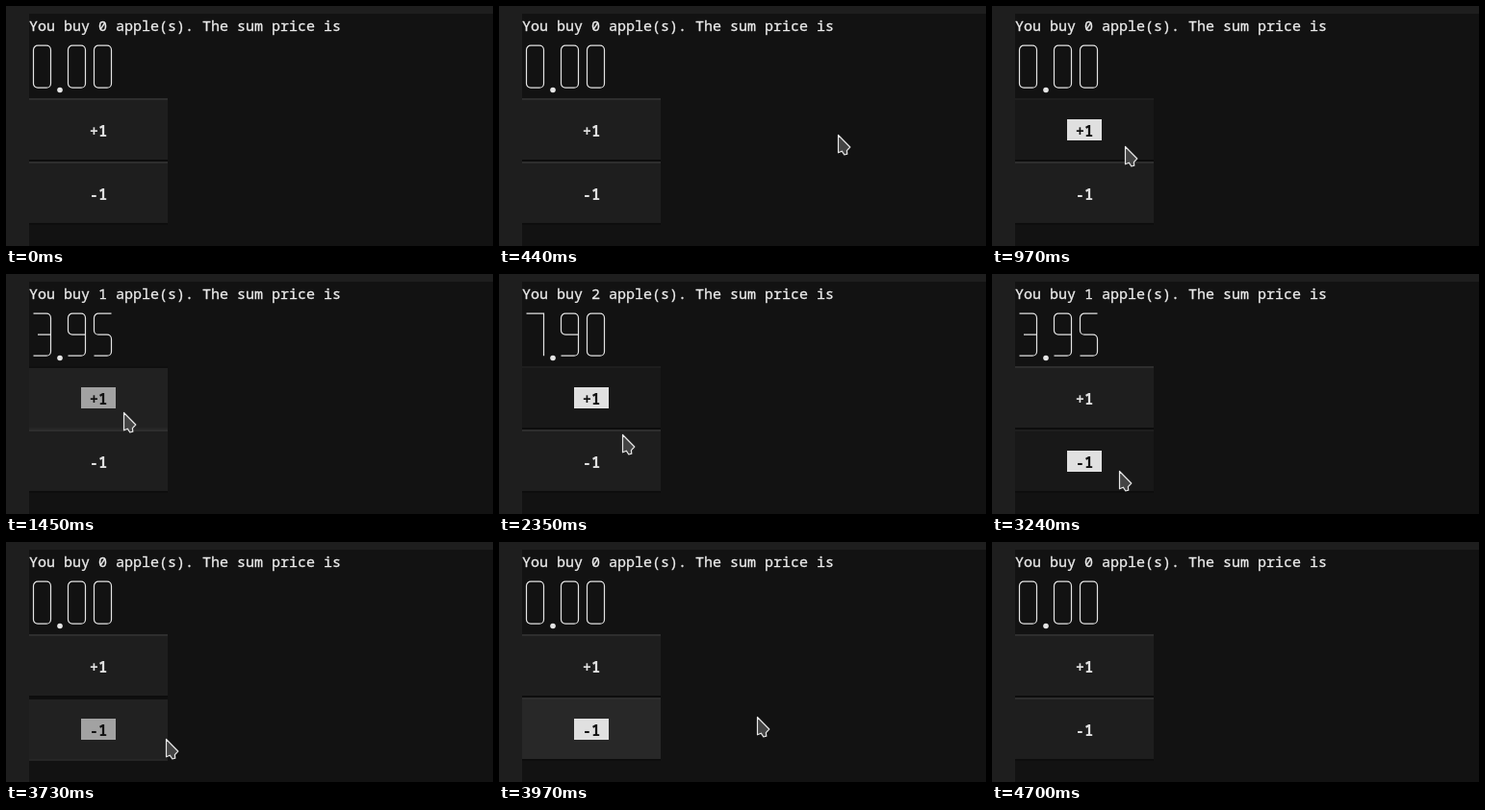
Write an HTML page that moves like this. It is 506x250 px and loops after 4.78 s.

```html
<!DOCTYPE html>
<html lang="en">
<head>
<meta charset="utf-8">
<title>Apple counter</title>
<style>
  html, body { margin: 0; width: 100%; height: 100%; overflow: hidden; background: #1e1e1e; }
  svg { display: block; width: 506px; height: 250px; }
  text { font: 15px "Noto Sans Mono", "DejaVu Sans Mono", monospace; white-space: pre; }
  .line { fill: #ececec; stroke: #ececec; stroke-width: .3; }
  .label { font-size: 15.5px; font-weight: 700; text-anchor: middle; }
  .digit { fill: none; stroke: #e4e4e4; stroke-width: 1.2; }
</style>
</head>
<body>
<svg id="stage" viewBox="0 0 506 250"></svg>
<script>
const LOOP = 4780, STEP = 40, HOLD = 200, PRICE = 3.95;
const FOCUS_IN = 650, FOCUS_OUT = 4700;
const BACK = 18, SURFACE = 30, LIGHT = 46, DARK = 13, FORE = 224;

// Digit outlines on an 18 x 44 grid
const turn = (sweep, x, y) => `a4.5 4.5 0 0 ${sweep} ${x} ${y}`;
const upperLeft = `V4.5${turn(1, 4.5, -4.5)}`;
const upperRight = `H13.5${turn(1, 4.5, 4.5)}`;
const lowerRight = `V39.5${turn(1, -4.5, 4.5)}`;
const lowerLeft = `H4.5${turn(1, -4.5, -4.5)}`;
const GLYPHS = {
  0: `M4.5 0${upperRight}${lowerRight}${lowerLeft}${upperLeft}Z`,
  3: `M0 0${upperRight}${lowerRight}H0M4.5 22H18`,
  5: `M18 0H4.5${turn(0, -4.5, 4.5)}V17.5${turn(0, 4.5, 4.5)}${upperRight}${lowerRight}H0`,
  7: 'M0 0H18V44',
  9: `M18 22${lowerLeft}${upperLeft}${upperRight}${lowerRight}H0`
};

const linear = u => u;
const smooth = u => u * u * (3 - 2 * u);
const easeIn = n => u => u ** n;
const easeOut = n => u => 1 - (1 - u) ** n;

// Each stroke carries the pointer on from where the last one ended
const ENTRY = [462, -44];
const STROKES = [
  { at: 160, span: 280, to: [352, 134], ease: easeOut(2) },
  { at: 850, span: 320, to: [116, 147], ease: easeOut(4) },
  { at: 1290, span: 160, to: [122, 144], ease: smooth },
  { at: 1860, span: 0, to: [108, 131], ease: linear },
  { at: 2230, span: 320, to: [155, 217], ease: smooth },
  { at: 2710, span: 320, to: [132, 205], ease: smooth },
  { at: 3570, span: 520, to: [340, 109], ease: easeIn(1.75), easeY: easeIn(6) },
  { at: 4130, span: 200, to: [440, -40], ease: linear }
];

const CLICKS = [
  { at: 1410, add: 1 }, { at: 2020, add: 1 },
  { at: 3030, add: -1 }, { at: 3570, add: -1 }
];

const stage = document.getElementById('stage');

function add(tag, attrs, text = '') {
  const el = document.createElementNS('http://www.w3.org/2000/svg', tag);
  for (const key in attrs) el.setAttribute(key, attrs[key]);
  el.textContent = text;
  return stage.appendChild(el);
}

const mix = (a, b, k) => a + (b - a) * k;
const grey = v => `rgb(${[v, v, v].map(Math.round)})`;
const fill = (el, v) => el.setAttribute('fill', grey(v));

add('rect', { x: 24, y: 8, width: 482, height: 242, fill: grey(BACK) });
const line = add('text', { class: 'line', x: 24, y: 26 });
const digits = [28.5, 64.5, 91.5].map(x =>
  add('path', { class: 'digit', transform: `translate(${x} 41.2)` }));
add('circle', { cx: 56, cy: 87.5, r: 2.8, fill: '#e4e4e4' });

const buttons = [1, -1].map((step, i) => {
  const y = 96 + 66 * i;
  const bar = (top, height) => add('rect', { x: 24, y: y + top, width: 144, height });
  return {
    y, step,
    body: bar(0, 66),
    top: bar(0, 2),
    bottom: bar(64, 2),
    mark: add('rect', { x: 78, y: y + 22, width: 36, height: 22 }),
    label: add('text', { class: 'label', x: 96, y: y + 39.7 }, step > 0 ? '+1' : '-1')
  };
});

const pointer = add('path', {
  d: 'M.5 .5V18.8L4.3 17.2 6.8 21 9.8 20.2 9.4 16.6 12.8 13Z',
  fill: '#444', stroke: '#e8e8e8', 'stroke-width': 1.2, 'stroke-linejoin': 'round'
});

function pointerAt(t) {
  let [x, y] = ENTRY;
  for (const { at, span, to, ease, easeY = ease } of STROKES) {
    if (t < at) break;
    const done = Math.floor((t - at) / STEP) + 1;
    const u = Math.min(1, done / (span / STEP + 1));
    x = mix(x, to[0], ease(u));
    y = mix(y, to[1], easeY(u));
  }
  return [x, y];
}

function paint(b, focus, hover, active) {
  const tint = v => active ? mix(v, BACK, 0.3) : v;
  const base = hover && !active ? DARK : SURFACE;
  fill(b.body, tint(focus ? mix(base, FORE, 0.05) : base));
  fill(b.top, tint(active ? DARK : hover ? SURFACE : LIGHT));
  fill(b.bottom, tint(active ? LIGHT : DARK));
  fill(b.mark, tint(FORE));
  b.mark.setAttribute('visibility', focus ? 'visible' : 'hidden');
  fill(b.label, focus ? BACK : FORE);
}

function draw(t) {
  const past = CLICKS.filter(c => c.at <= t);
  const last = past[past.length - 1];
  const count = past.reduce((sum, c) => sum + c.add, 0);
  const focused = t >= FOCUS_IN && t < FOCUS_OUT ? (last ? last.add : 1) : 0;

  line.textContent = `You buy ${count} apple(s). The sum price is`;
  const price = (count * PRICE).toFixed(2).replace('.', '');
  digits.forEach((el, i) => el.setAttribute('d', GLYPHS[price[i]]));

  // Hover lags one step behind the pointer
  const [hx, hy] = pointerAt(t - STEP);
  for (const b of buttons) {
    const hover = hx >= 24 && hx < 168 && hy >= b.y && hy < b.y + 66;
    const active = !!last && last.add === b.step && t < last.at + HOLD;
    paint(b, focused === b.step, hover, active);
  }
  pointer.setAttribute('transform', `translate(${pointerAt(t).map(Math.round)})`);
}

const begin = performance.now();
function tick() {
  draw((performance.now() - begin) % LOOP);
  requestAnimationFrame(tick);
}
tick();
</script>
</body>
</html>
```
